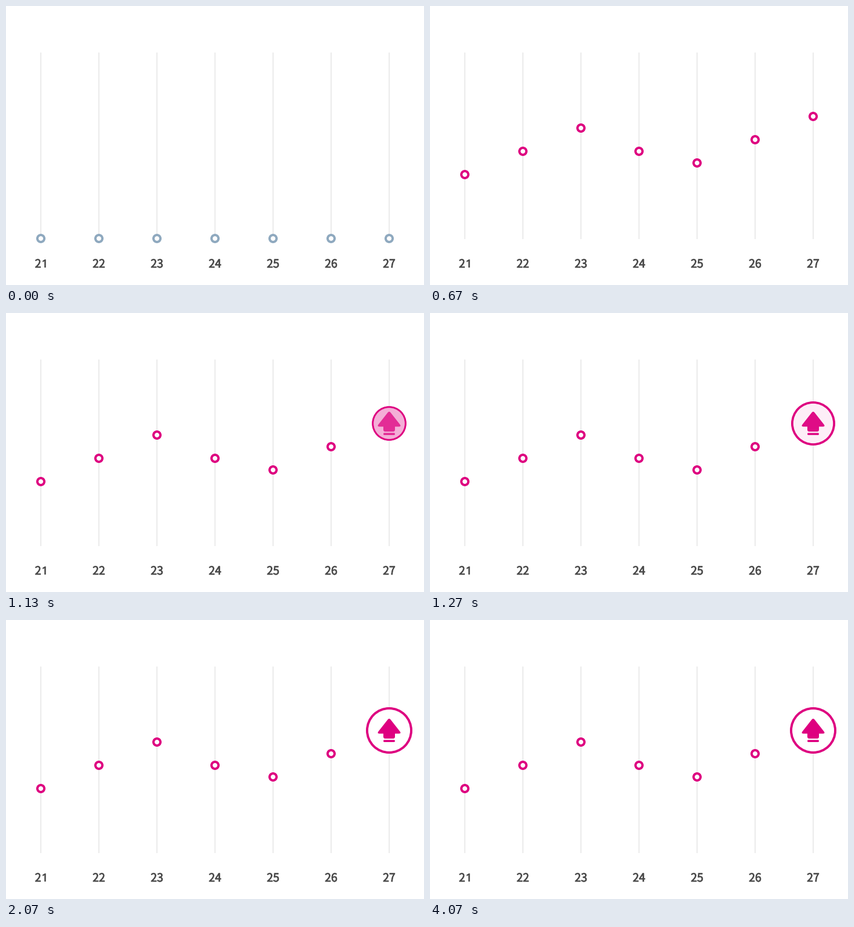
Animation of 720x480 px, one loop 4210 ms. Source, as a matplotlib script:

```python
import numpy as np
import matplotlib.pyplot as plt
from matplotlib.animation import FuncAnimation
from matplotlib.colors import to_rgb
from matplotlib.patches import Circle, PathPatch, Polygon
from matplotlib.path import Path
from matplotlib.patheffects import withStroke

W, H, DPI = 720, 480, 80
PT = 72 / DPI  # points per pixel
LOOP, TICK = 4210, 10

STEEL, MAGENTA, WHITE = "#8fa9bf", "#de0080", "#ffffff"
GRID, INK = "#ebebeb", "#4a4a4a"

XS = range(60, 661, 100)
BASE = 400
TOPS = [290, 250, 210, 250, 270, 230, 190]
RISE_START, RISE_TIME = 153, 500
GROW_START, GROW_TIME = RISE_START + RISE_TIME, 800


def ease(t, start, span):
    """Cubic in-out progress between 0 and 1."""
    u = min(max((t - start) / span, 0), 1)
    return 4 * u ** 3 if u < 0.5 else 1 - 4 * (1 - u) ** 3


def mix(a, b, k):
    return tuple(np.array(to_rgb(a)) * (1 - k) + np.array(to_rgb(b)) * k)


def rounded(corners):
    """Closed path through (x, y, cut) corners, each softened by its cut."""
    pts = np.array([c[:2] for c in corners], float)
    verts, codes = [], []
    for i, (_, _, cut) in enumerate(corners):
        p, before, after = pts[i], pts[i - 1], pts[(i + 1) % len(pts)]
        enter = p + (before - p) / np.linalg.norm(before - p) * cut
        leave = p + (after - p) / np.linalg.norm(after - p) * cut
        verts += [enter, p, leave]
        codes += [Path.LINETO if i else Path.MOVETO, Path.CURVE3, Path.CURVE3]
    return Path(verts + [verts[0]], codes + [Path.CLOSEPOLY])


def arrow_path(x):
    head = rounded([
        (x, 168.2, 4), (x + 21.5, 195.5, 5), (x + 10, 195.5, 0.1),
        (x + 10, 204, 3), (x - 10, 204, 3), (x - 10, 195.5, 0.1),
        (x - 21.5, 195.5, 5),
    ])
    bar = rounded([
        (x - 10, 206.3, 1.8), (x + 10, 206.3, 1.8),
        (x + 10, 210, 1.8), (x - 10, 210, 1.8),
    ])
    return Path.make_compound_path(head, bar)


def label(x, text):
    ax.text(x, 450, text, ha="center", va="baseline", color=INK,
            family="Noto Sans CJK JP", size=19.5 * PT,
            path_effects=[withStroke(linewidth=0.8 * PT, foreground=INK)])


fig = plt.figure(figsize=(W / DPI, H / DPI), dpi=DPI, facecolor=WHITE)
ax = fig.add_axes([0, 0, 1, 1])
ax.set_xlim(0, W)
ax.set_ylim(H, 0)
ax.axis("off")

for x in XS:
    ax.plot([x, x], [80, 401], color=GRID, lw=2 * PT,
            solid_capstyle="butt", zorder=1)

# The "1" of the first label is a plain stem with a flag and no foot.
label(55.2, "2")
ax.add_patch(Polygon([(66.9, 436), (68.7, 436), (68.7, 450), (66.1, 450),
                      (66.1, 439.2), (63, 440.6), (63, 438.3)],
                     fc=INK, lw=0))
for i, x in enumerate(XS):
    if i:
        label(x, str(21 + i))

dots = [ax.add_patch(Circle((x, BASE), 6, fc=WHITE, lw=4 * PT, zorder=3))
        for x in XS]
disc = ax.add_patch(Circle((XS[-1], TOPS[-1]), 0, ec=MAGENTA, zorder=4))
arrow = ax.add_patch(PathPatch(arrow_path(XS[-1]), fc=MAGENTA, lw=0, zorder=5))


def draw(i):
    # The picture refreshes 30 times a second.
    t = int((i * TICK + 5) * 0.03) * 100 / 3

    rise = ease(t, RISE_START, RISE_TIME)
    color = mix(STEEL, MAGENTA, rise)
    for dot, x, top in zip(dots, XS, TOPS):
        dot.set_center((x, BASE + (top - BASE) * rise))
        dot.set_edgecolor(color)

    grow = ease(t, GROW_START, GROW_TIME)
    disc.set_visible(grow > 0)
    disc.set_radius(38 * grow)
    disc.set_linewidth(4 * PT * grow)
    disc.set_facecolor(mix(MAGENTA, WHITE, grow ** 1.3))
    arrow.set_alpha(grow)
    return [*dots, disc, arrow]


anim = FuncAnimation(fig, draw, frames=LOOP // TICK, interval=TICK,
                     init_func=lambda: draw(0), repeat=True, repeat_delay=0)
plt.show()
```
